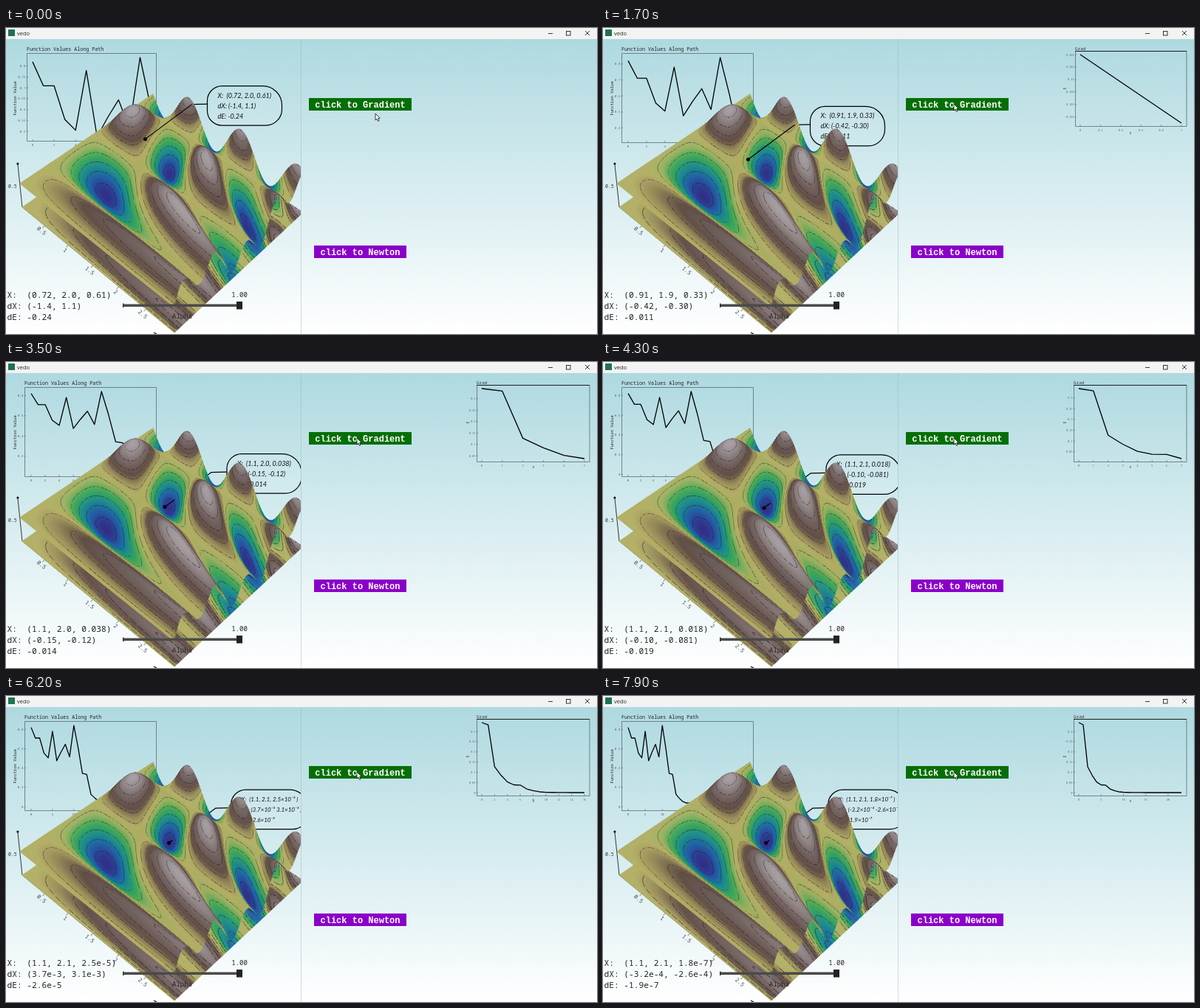
Recreate the animation shown at these times as an HTML page with a canvas. Size 800x415 px, loop 8000 ms.

```html
<!DOCTYPE html>
<html lang="en">
<head>
<meta charset="utf-8">
<title>vedo</title>
<style>
html, body { margin: 0; width: 100%; height: 100%; overflow: hidden; background: #fff; }
canvas { display: block; width: 800px; height: 415px; }
</style>
</head>
<body>
<canvas id="stage" width="800" height="415"></canvas>
<script>
const LOOP = 8000, W = 800, H = 415;
const MONO = '"Noto Sans Mono", "DejaVu Sans Mono", monospace';
const stage = document.getElementById('stage').getContext('2d');
let g = stage;

// ---------- drawing helpers ----------
function text(s, x, y, size, { font = MONO, color = '#222', align = 'left', turn = 0, style = '' } = {}) {
  g.save();
  g.translate(x, y);
  g.rotate(turn);
  g.font = `${style} ${size}px ${font}`;
  g.textAlign = align;
  g.fillStyle = color;
  g.fillText(s, 0, 0);
  g.restore();
}

function trace(pts) {
  g.beginPath();
  pts.forEach(([x, y]) => g.lineTo(x, y));
}

function line(pts, color = '#000', width = 1) {
  trace(pts);
  g.strokeStyle = color;
  g.lineWidth = width;
  g.stroke();
}

function rect(x, y, w, h, color) {
  g.fillStyle = color;
  g.fillRect(x, y, w, h);
}

function dot(x, y, r) {
  g.beginPath();
  g.arc(x, y, r, 0, 7);
  g.fillStyle = '#000';
  g.fill();
}

const mix = (a, b, k) => a.map((v, i) => v + (b[i] - v) * k);

// piecewise linear lookup; the first column is the key
function lookup(rows, key) {
  const i = rows.findIndex(r => r[0] > key);
  if (i < 0) return rows[rows.length - 1].slice(1);
  if (i === 0) return rows[0].slice(1);
  const [a, b] = [rows[i - 1], rows[i]];
  return mix(a, b, (key - a[0]) / (b[0] - a[0])).slice(1);
}

// ---------- surface ----------
const SIDE = 3;
const height = (x, y) => (1 + Math.sin(2 * x * y) * Math.cos(3 * y)) / 2;

// perspective view of the box
function project(x, y, z) {
  const u = x / SIDE, v = y / SIDE, w = 1 - .132 * u + .134 * v - .022 * z;
  return [(22 + 176 * u + 205 * v - 6.5 * z) / w, (243 + 115.5 * u - 108 * v - 63 * z) / w];
}

// height, red, green, blue
const EARTH = [
  [0, 52, 48, 136], [.1, 36, 96, 168], [.2, 28, 142, 142], [.31, 62, 168, 88],
  [.42, 160, 178, 98], [.52, 181, 175, 102], [.6, 150, 138, 90], [.69, 98, 78, 71],
  [.82, 116, 100, 98], [1, 168, 160, 164]
];

// crossing of one contour level with the edges of a cell
function contour(corners, level) {
  const cuts = [];
  corners.forEach((a, i) => {
    const b = corners[(i + 1) % 4];
    if ((a.z < level) !== (b.z < level)) cuts.push(mix(a.at, b.at, (level - a.z) / (b.z - a.z)));
  });
  return cuts;
}

// cells from far to near, so that near ones cover far ones
function drawSheet(cells, lift) {
  const d = SIDE / cells;
  const corner = (i, j) => {
    const x = i * d, y = j * d, z = height(x, y);
    return { z, at: project(x, y, lift(z)) };
  };
  for (let j = cells - 1; j >= 0; j--) {
    for (let i = 0; i < cells; i++) {
      const q = [corner(i, j), corner(i + 1, j), corner(i + 1, j + 1), corner(i, j + 1)];
      const color = `rgb(${lookup(EARTH, (q[0].z + q[2].z) / 2).map(Math.round)})`;
      line([...q, q[0]].map(c => c.at), color, .7);
      g.fillStyle = color;
      g.fill();
      const low = Math.min(...q.map(c => c.z)), level = Math.ceil(low * 10 - .5) / 10 + .05;
      if ((i + j) % 5 && level > low) line(contour(q, level), 'rgba(20,18,15,.9)', .8);
    }
  }
}

function drawSurface() {
  g.beginPath();
  g.rect(0, 15, 399, 400);
  g.clip();
  drawSheet(110, () => 0);
  drawSheet(170, z => z + .05);
}

function button(label, x, y, w, color) {
  rect(x, y, w, 17, color);
  text(label, x + w / 2, y + 12.5, 12, {
    font: '"Liberation Mono", monospace', style: 'bold', color: '#fff', align: 'center'
  });
}

function drawBackdrop() {
  const sky = g.createLinearGradient(0, 15, 0, H);
  sky.addColorStop(0, '#aed9e0');
  sky.addColorStop(1, '#ffffff');
  rect(0, 0, W, H, sky);
  rect(0, 0, W, 15, '#f3f3f3');
  rect(399, 15, 1, 400, 'rgba(150,180,188,.45)');
  rect(3, 2, 9, 9, '#1d7350');
  text('vedo', 15, 10, 7.5, { font: '"Open Sans", sans-serif' });
  line([[734, 7.5], [740, 7.5]], '#222', .9);
  g.strokeRect(758.5, 4.5, 5.5, 5.5);
  line([[784, 4], [790, 10]], '#222', .9);
  line([[790, 4], [784, 10]], '#222', .9);
  button('click to Gradient', 410, 95, 139, '#056f05');
  button('click to Newton', 417, 295, 125, '#8a00c9');
}

function layer(draw) {
  const c = document.createElement('canvas');
  c.width = W;
  c.height = H;
  g = c.getContext('2d');
  draw();
  g = stage;
  return c;
}

// ---------- descent ----------
const PATH = [.82, .71, .71, .555, .505, .78, .475, .565, .645, .515, .84, .61];
const GRAD = [.344, .333, .127, .085, .052, .038, .037, .018, .0095, .0037];
const START = { place: [.72, 2], slope: [-1.4, 1.1], change: -.24 };

const energy = n => n < 0 ? PATH[PATH.length - 1] : n < 10 ? GRAD[n] : 1.74e-3 / 2.023 ** (n - 10);
const place = n => n < 0 ? START.place : [1.12 - .3 * .7 ** n, 2.09 - .25 * .7 ** n];

// slope size at each step, then a steady geometric fall
const SLOPE = [[1, .42, .3], [3, .21, .16], [7, .1, .081], [10, .031, .0258]];

function slope(n) {
  if (n < 0) return START.slope;
  const k = (n % 2 ? -1 : 1) / 1.423 ** Math.max(0, n - 10);
  return lookup(SLOPE, n).map(v => v * k);
}

const short = v => Math.abs(v) < .01 ? v.toExponential(1) : v.toPrecision(2);

function report(n) {
  const change = n < 0 ? START.change : energy(n) - energy(n - 1);
  return [
    `X:  (${[...place(n), energy(n)].map(short).join(', ')})`,
    `dX: (${slope(n).map(short).join(', ')})`,
    `dE: ${short(change)}`
  ];
}

const STEPS = [[1100, 0], [1600, 1], [2600, 3], [4200, 7], [4900, 10], [6100, 16], [7800, 23]];
const stepAt = t => t < 1100 ? -1 : Math.floor(lookup(STEPS, t)[0] + 1e-6);

// ---------- charts ----------
function tickStep(span, limit) {
  let base = 10 ** Math.floor(Math.log10(span) - 1);
  for (;; base *= 10)
    for (const m of [1, 2, 5]) if (span / (m * base) < limit) return m * base;
}

function ticks(lo, hi, limit, draw) {
  const step = tickStep(hi - lo, limit);
  for (let i = Math.ceil(lo / step - .15); i * step <= hi + step * .1; i++)
    draw(i * step, String(+(i * step).toPrecision(3)));
}

function chart(values, [l, t, r, b], [x0, y0, x1, y1], size) {
  const n = values.length - 1, hi = Math.max(...values), lo = Math.min(...values);
  const px = i => x0 + (x1 - x0) * i / n;
  const py = v => y0 + (y1 - y0) * (hi - v) / (hi - lo);
  const ink = { color: '#5b696d', align: 'center' }, pen = '#4d5d61';
  g.strokeStyle = pen;
  g.lineWidth = .7;
  g.strokeRect(l + .5, t + .5, r - l, b - t);
  ticks(0, n, 10, (v, s) => {
    line([[px(v), b], [px(v), b - 2]], pen, .6);
    text(s, px(v), b + 6.5, size, ink);
  });
  ticks(lo, hi, 8, (v, s) => {
    line([[l, py(v)], [l + 2, py(v)]], pen, .6);
    text(s, l - 1.5, py(v) + 1.5, size, { ...ink, align: 'right' });
  });
  g.lineJoin = 'round';
  line(values.map((v, i) => [px(i), py(v)]), '#000', 1.3);
}

function drawCharts(n) {
  const grad = Array.from({ length: n + 1 }, (_, i) => energy(i));
  const first = n < 0, l = first ? 28 : 25;
  chart([...PATH, ...grad], [l, 34, 203, first ? 153 : 155], [first ? 36 : 34, 40, 196, first ? 147.5 : 150], 4.3);
  text('Function Values Along Path', l, 31, 6.7);
  text('Function Value', 14, 118.5, 5.5, { turn: -Math.PI / 2 });
  if (n < 1) return;
  const gl = n < 2 ? 639 : 637, bottom = n < 2 ? 133 : 135;
  chart(grad, [gl, 31, 789.5, bottom], [gl + 7, 36, 783, bottom - 4], 3.5);
  line([[gl, 31.5], [790, 31.5]], '#111', .9);
  text('Grad', gl, 30, 6, { color: '#333' });
  text('x', 714, 144, 5, { align: 'center', color: '#444' });
  text('E', 627, 82, 5, { turn: -Math.PI / 2, align: 'center', color: '#444' });
}

// ---------- callout ----------
const LEAD = [63, -47];
const spot = n => project(...place(n), energy(n) + .05);

// 1.7e-3 as 1.7×10⁻³
const raised = s => s.replace(/e-(\d),? ?/g, (_, d) => '×10⁻' + '⁰¹²³⁴⁵⁶⁷⁸⁹'[d] + ' ');

function drawCallout(n) {
  const [x, y] = spot(n), ex = x + LEAD[0], ey = y + LEAD[1];
  const rows = report(n).map(raised);
  const longest = Math.max(...rows.map(s => s.length));
  const left = ex + 21, top = ey - 25, width = 80 + longest;
  line([[x, y], [ex, ey], [left, ey - .5]], '#000', 1.2);
  g.beginPath();
  g.roundRect(left, top, width, 53.5, [20, 26, 22, 20]);
  g.fillStyle = 'rgba(255,255,255,.08)';
  g.fill();
  g.stroke();
  rows.forEach((s, i) => text(s, left + 14, top + 16 + i * 14, longest > 22 ? 8 : 9,
    { font: 'Lato, "DejaVu Sans", sans-serif', style: 'italic', color: '#111' }));
}

// the deeper the point, the sooner its leader dips behind the surface
function drawLeader(n) {
  const [x, y] = spot(n), k = Math.min(1, (6 + 280 * energy(n)) / Math.hypot(...LEAD));
  line([[x, y], [x + LEAD[0] * k, y + LEAD[1] * k]], '#000', 1.2);
  dot(x, y, 2.5);
}

// ---------- axes, slider, pointer ----------
function drawAxes() {
  const top = project(0, 0, 1);
  line([project(0, 0, 0), top], '#222', .9);
  dot(...top, 1.5);
  text('0.5', 3, 217, 6.5, { color: '#333' });
  line([project(0, 0, 0), project(SIDE, 0, 0)], '#444', .8);
  for (let x = .5; x < SIDE; x += .5) {
    const [px, py] = project(x, 0, 0);
    line([[px, py], [px - 3, py + 3]], '#333', .7);
    text(String(x), px - 6, py + 9, 7.5, { turn: .7, align: 'center', color: '#444' });
  }
  line([[200, 413], [204, 415]], '#111', 1.2);
}

function drawSlider() {
  rect(159, 374.5, 160, 3.5, '#4a4a4a');
  rect(158, 373.5, 1.5, 5.5, '#333');
  rect(312, 371, 8, 10.5, '#222');
  text('1.00', 316, 364.5, 9, { align: 'center' });
  text('Alpha', 238.5, 393.5, 9, { align: 'center', color: '#2a2522' });
}

function drawPointer(t) {
  const k = Math.min(1, t / 900);
  const [x, y] = mix([500, 116], [475, 103], k * k * (3 - 2 * k));
  const arrow = [[0, 0], [0, 9], [2, 7.2], [3.5, 10.4], [5, 9.7], [3.6, 6.6], [6.2, 6.4]];
  trace(arrow.map(p => [p[0] + x, p[1] + y]));
  g.closePath();
  g.fillStyle = '#fff';
  g.fill();
  g.strokeStyle = '#111';
  g.lineWidth = .8;
  g.stroke();
}

const backdrop = layer(drawBackdrop);
const surface = layer(drawSurface);

function draw(t) {
  const n = stepAt(t);
  g.drawImage(backdrop, 0, 0);
  drawCharts(n);
  g.save();
  g.beginPath();
  g.rect(0, 15, 399, 400);
  g.clip();
  drawCallout(n);
  drawAxes();
  g.drawImage(surface, 0, 0);
  drawLeader(n);
  drawSlider();
  report(n).forEach((s, i) => text(s, 1.5, 365.5 + i * 15, 11.2));
  g.restore();
  drawPointer(t);
}

const start = performance.now();
function tick() {
  const t = (performance.now() - start) % LOOP;
  draw(Math.floor(t / 100) * 100);
  requestAnimationFrame(tick);
}
tick();
</script>
</body>
</html>
```
